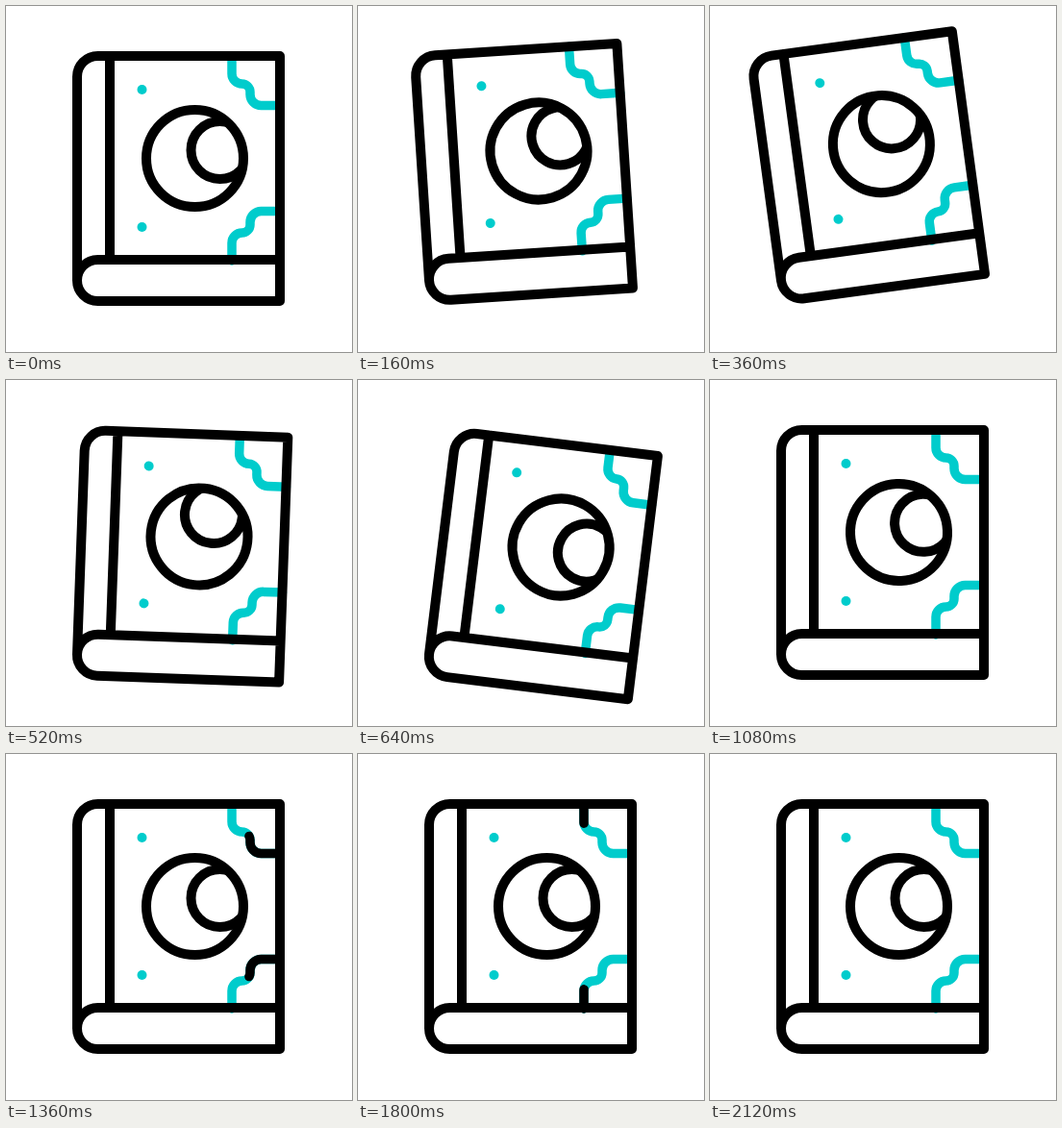
These frames come from a looping animation (360x360 px, 2.52 s). An HTML page with a canvas:

```html
<!DOCTYPE html>
<html lang="en">
<head>
<meta charset="utf-8">
<title>Book of the moon</title>
<style>
html, body { margin: 0; width: 100%; height: 100%; overflow: hidden; background: #fff; }
canvas { display: block; width: 100vmin; height: 100vmin; }
</style>
</head>
<body>
<canvas id="stage"></canvas>
<script>
const canvas = document.getElementById('stage');
const ctx = canvas.getContext('2d');
const LOOP = 2520, STEP = 40;
const BLACK = '#000', TEAL = '#00cccc';
const PIVOT = { x: 77, y: 285.5 };
const MOON = { x: 196.5, y: 158.5 };

// [time, value] keys, eased in and out
const TILT = [[0, 0], [335, -8], [635, 7], [1040, 0]];
const SPIN = [[0, 0], [470, -48], [1110, 360]];
const HEAD = [[1080, 0], [1640, 1]];
const TAIL = [[1360, 0], [2000, 1]];

const cover = new Path2D(
  'M74 285.5 V73.5 A21.5 21.5 0 0 1 95.5 52 H285 V307 H95.5' +
  ' A21.5 21.5 0 0 1 95.5 264 H285 M108 52 V264');

// Ornament, drawn from the fore-edge towards the inside
const wave = new Path2D(
  'M285 103.5 H265.5 A11.5 11.5 0 0 1 254 92 V89.5' +
  ' A8.5 8.5 0 0 0 245.5 81 A10.5 10.5 0 0 1 235 70.5 V52');
const waveLength = 19.5 + 2.5 + 18.5 + (11.5 + 8.5 + 10.5) * Math.PI / 2;

const rad = deg => deg * Math.PI / 180;

function track(keys, t) {
  if (t <= keys[0][0]) return keys[0][1];
  for (let i = 1; i < keys.length; i++) {
    const [t0, v0] = keys[i - 1], [t1, v1] = keys[i];
    if (t < t1) {
      const u = (t - t0) / (t1 - t0);
      return v0 + (v1 - v0) * u * u * (3 - 2 * u);
    }
  }
  return keys[keys.length - 1][1];
}

function circle(x, y, r) {
  ctx.beginPath();
  ctx.arc(x, y, r, 0, Math.PI * 2);
}

function drawWave(head, tail) {
  ctx.lineWidth = 9.5;
  ctx.strokeStyle = TEAL;
  ctx.stroke(wave);
  if (head > tail) {
    ctx.strokeStyle = BLACK;
    ctx.setLineDash([(head - tail) * waveLength, 999]);
    ctx.lineDashOffset = -tail * waveLength;
    ctx.stroke(wave);
    ctx.setLineDash([]);
  }
}

function drawMoon(angle) {
  ctx.save();
  ctx.translate(MOON.x, MOON.y);
  ctx.rotate(rad(angle));
  ctx.lineWidth = 10;
  ctx.strokeStyle = BLACK;
  circle(0, 0, 50.5);
  ctx.stroke();
  ctx.clip();
  circle(26, -8.5, 30);
  ctx.stroke();
  ctx.restore();
}

function draw(t) {
  const scale = canvas.width / 360;
  ctx.setTransform(scale, 0, 0, scale, 0, 0);
  ctx.fillStyle = '#fff';
  ctx.fillRect(0, 0, 360, 360);
  ctx.lineCap = ctx.lineJoin = 'round';

  ctx.translate(PIVOT.x, PIVOT.y);
  ctx.rotate(rad(track(TILT, t)));
  ctx.translate(-PIVOT.x, -PIVOT.y);

  ctx.fillStyle = TEAL;
  for (const y of [87, 230]) {
    circle(141.5, y, 5);
    ctx.fill();
  }

  const head = track(HEAD, t), tail = track(TAIL, t);
  drawWave(head, tail);
  ctx.save();
  ctx.translate(0, 2 * MOON.y);
  ctx.scale(1, -1);
  drawWave(head, tail);
  ctx.restore();

  drawMoon(track(SPIN, t));
  ctx.lineWidth = 10;
  ctx.strokeStyle = BLACK;
  ctx.stroke(cover);
}

function resize() {
  const side = Math.min(innerWidth, innerHeight) || 360;
  canvas.width = canvas.height = Math.round(side * (devicePixelRatio || 1));
}

const start = performance.now();
function tick() {
  const t = (performance.now() - start) % LOOP;
  draw(Math.floor(t / STEP) * STEP);
  requestAnimationFrame(tick);
}

addEventListener('resize', resize);
resize();
tick();
</script>
</body>
</html>
```
